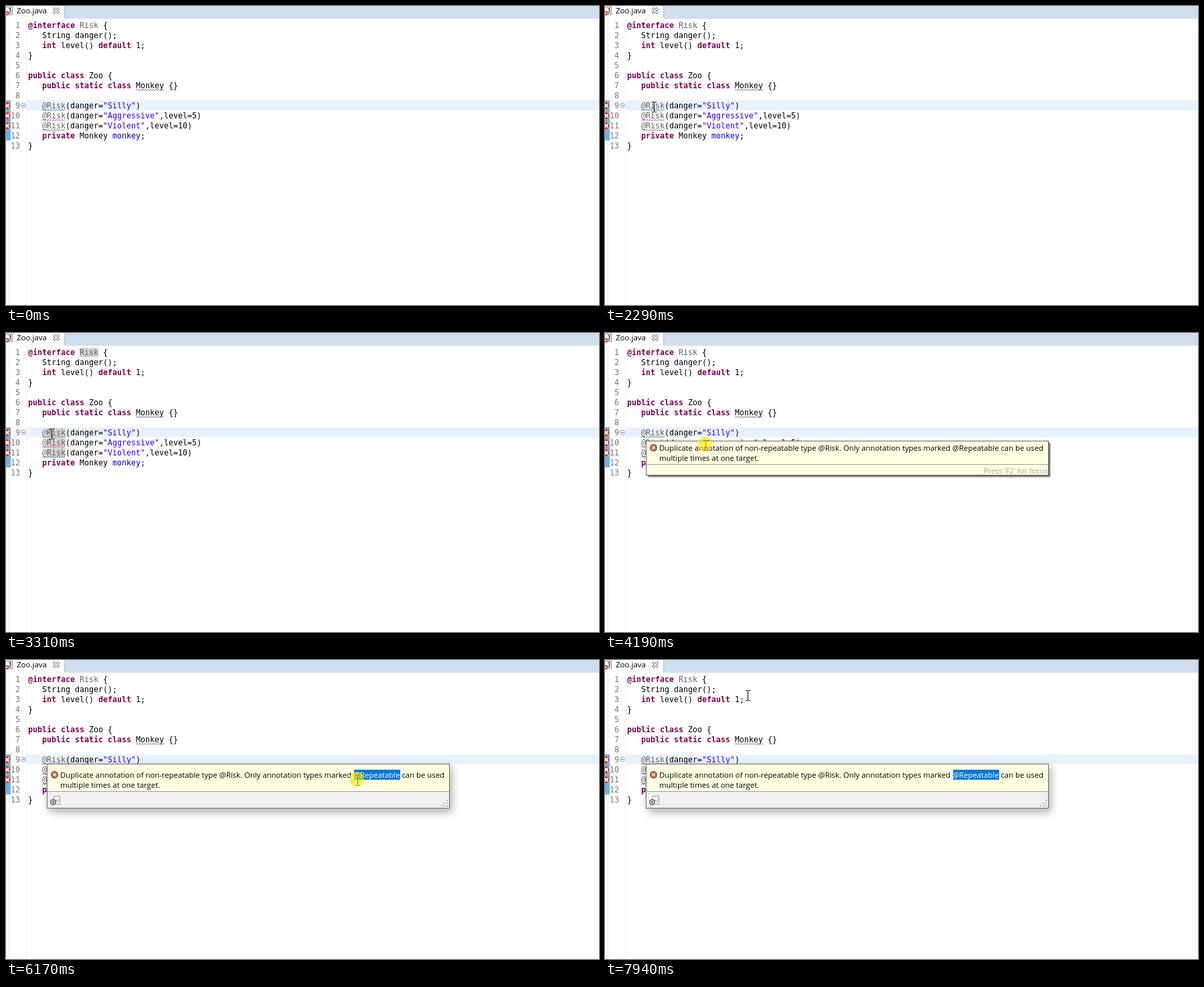
An HTML page with a canvas for the animation above (8000 ms loop, 886 by 447 pixels).

```html
<!DOCTYPE html>
<html lang="en">
<head>
<meta charset="utf-8">
<title>Editor hover</title>
<style>
  html, body { margin: 0; width: 100%; height: 100%; overflow: hidden; background: #fff; }
  canvas { display: block; }
</style>
</head>
<body>
<canvas id="stage" width="886" height="447"></canvas>
<script>
const ctx = document.getElementById('stage').getContext('2d');
const LOOP = 8000, CHAR = 7, LEFT = 33, ROW = 15;
const MONO = '11.63px "DejaVu Sans Mono", monospace';
const UI = '"Open Sans", "Noto Sans", sans-serif';
const KEYWORDS = /^(@interface|int|default|public|static|class|private)$/;

const code = `@interface Risk {
   String danger();
   int level() default 1;
}

public class Zoo {
   public static class Monkey {}

   @Risk(danger="Silly")
   @Risk(danger="Aggressive",level=5)
   @Risk(danger="Violent",level=10)
   private Monkey monkey;
}`.split('\n');
const message = [
  'Duplicate annotation of non-repeatable type @Risk. Only annotation types marked @Repeatable can be used',
  'multiple times at one target.'
];

// Each eased move: start, end, destination x, y
const entry = [438, 353];
const moves = [
  [70, 520, 8, 109],
  [600, 1080, 73, 151],
  [2290, 2910, 68, 151],
  [3710, 4120, 150, 168],
  [4330, 4600, 258, 174],
  [4700, 4940, 388, 181],
  [4970, 5290, 591, 173],
  [5420, 5760, 598, 172],
  [5960, 6170, 525, 180],
  [7520, 7940, 213, 53]
];

const within = (t, a, b) => t >= a && t < b;
const clamp = (v, lo, hi) => Math.min(hi, Math.max(lo, v));
const ease = u => u * u * (3 - 2 * u);
const lineTop = n => 22 + (n - 1) * ROW;

function rect(x, y, w, h, color) {
  ctx.fillStyle = color;
  ctx.fillRect(x, y, w, h);
}

function disc(x, y, r, color) {
  ctx.fillStyle = color;
  ctx.beginPath();
  ctx.arc(x, y, r, 0, Math.PI * 2);
  ctx.fill();
}

function stroke(points, color, width = 1) {
  ctx.strokeStyle = color;
  ctx.lineWidth = width;
  ctx.beginPath();
  points.forEach(([x, y], i) => i ? ctx.lineTo(x, y) : ctx.moveTo(x, y));
  ctx.stroke();
}

function cross(x, y, r, color, width) {
  stroke([[x - r, y - r], [x + r, y + r]], color, width);
  stroke([[x + r, y - r], [x - r, y + r]], color, width);
}

function text(str, x, y, font, color) {
  ctx.font = font;
  ctx.fillStyle = color;
  ctx.fillText(str, x, y);
}

function pointer(t) {
  let [x, y] = entry;
  for (const [start, end, toX, toY] of moves) {
    if (t < start) break;
    const u = ease(clamp((t - start) / (end - start), 0, 1));
    // small hand nudges while resting on the selection
    if (start === 7520) x = nudge(start - 1);
    x += (toX - x) * u;
    y += (toY - y) * u;
  }
  if (within(t, 6570, 7520)) x = nudge(t);
  return [Math.round(x), Math.round(y)];
}

function nudge(t) {
  const step = Math.floor((t - 6570) / 250);
  return 524.5 + 14.2 * Math.cos(step * Math.PI / 2 + 0.32);
}

function drawTab() {
  rect(0, 0, 886, 19, '#cfdeef');
  rect(0, 0, 87, 19, '#fff');
  rect(87, 0, 1, 18, '#b4c3d6');
  // file icon
  rect(0, 1, 10, 12, '#9b8a5c');
  rect(0, 2, 9, 10, '#f6f4ee');
  text('J', 2, 11, 'bold 11px "Liberation Sans", sans-serif', '#34508c');
  rect(0, 8, 4, 6, '#d8402c');
  cross(1.5, 11, 1.5, '#fff', 1);
  text('Zoo.java', 16, 11, '11.5px ' + UI, '#000');
  // close button
  cross(75, 7, 4, '#666', 3.6);
  cross(75, 7, 3.8, '#fff', 1.7);
}

function drawRuler() {
  rect(0, 19, 7, 428, '#f8f8f8');
  rect(30, 19, 1, 428, '#f0f0f0');
  rect(31, lineTop(9) - 1, 855, ROW, '#e8f2fe');
  for (let y = 141; y < 201; y++)
    for (let x = 0; x < 7; x++) rect(x, y, 1, 1, (x + y) % 2 ? '#0078d7' : '#d8ecfa');
  for (const n of [9, 10, 11]) {
    const y = lineTop(n) + 7;
    disc(1, y, 6, '#f3d3cd');
    disc(1, y, 5.5, '#d2392b');
    cross(2, y, 2.5, '#fff', 2);
  }
  ctx.strokeStyle = '#8c9db5';
  ctx.lineWidth = 1;
  ctx.beginPath();
  ctx.arc(26, 148.5, 3.5, 0, Math.PI * 2);
  ctx.stroke();
  rect(24, 148, 4, 1, '#60748f');
}

function tokenStyle(token) {
  if (KEYWORDS.test(token)) return ['bold ' + MONO, '#7f0055'];
  if (/^@?Risk$/.test(token)) return [MONO, '#646464'];
  if (token[0] === '"') return [MONO, '#2a00ff'];
  if (token === 'monkey') return [MONO, '#0000c0'];
  return [MONO, '#000'];
}

function drawCode() {
  code.forEach((line, i) => {
    const y = lineTop(i + 1) + 11, label = String(i + 1);
    text(label, 21 - CHAR * label.length, y, MONO, '#787878');
    for (const m of line.matchAll(/@?\w+|"[^"]*"|[^\w\s"@]+/g))
      text(m[0], LEFT + CHAR * m.index, y, ...tokenStyle(m[0]));
  });
}

function squiggle(n, word, color = '#6a6a6a') {
  const x = LEFT + CHAR * code[n - 1].indexOf(word), y = lineTop(n) + 13.5;
  const points = [];
  for (let i = 0; i <= CHAR * word.length; i += 2) points.push([x + i, y + (i % 4 ? -1 : 1)]);
  stroke(points, color);
}

function drawMarks() {
  for (const n of [1, 9, 10, 11]) {
    const column = code[n - 1].indexOf('Risk');
    rect(LEFT + CHAR * column, lineTop(n), CHAR * 4, 14, '#d4d4d4');
  }
}

function drawMessage() {
  disc(72.5, 171.5, 5.5, '#8f4a3c');
  disc(72.5, 171.5, 4.6, '#c9614e');
  cross(72.5, 171.5, 2, '#fff', 1.5);
  message.forEach((line, i) => text(line, 81, 176 + i * ROW, '11.33px ' + UI, '#000'));
}

function drawHint() {
  for (let i = 4; i > 1; i--) rect(61 + i, 161 + i, 601, 51, 'rgba(0,0,0,.25)');
  rect(61, 161, 602, 52, '#646464');
  rect(62, 162, 600, 50, '#ffffe1');
  rect(62, 196, 600, 1, '#a0a0a0');
  drawMessage();
  text("Press 'F2' for focus", 566, 210, '11px ' + UI, '#a9a99a');
}

function drawPopup() {
  ctx.save();
  ctx.shadowColor = 'rgba(0,0,0,.33)';
  ctx.shadowBlur = 12;
  ctx.shadowOffsetX = 3;
  ctx.shadowOffsetY = 5;
  rect(61, 155, 602, 67, '#6c6c6c');
  ctx.restore();
  rect(62, 156, 600, 65, '#f0f0f0');
  rect(62, 156, 600, 40, '#ffffe1');
  rect(62, 196, 600, 1, '#a0a0a0');
  drawMessage();
  // toolbar icon
  rect(71, 203, 10, 13, '#a8a29a');
  rect(72, 204, 8, 11, '#fbfaf7');
  stroke([[73, 213], [75, 209], [77, 212], [80, 208]], '#c98a70');
  disc(70.5, 212.5, 4.5, '#5c6f86');
  disc(70.5, 212.5, 2.8, '#dfe6ee');
  disc(70.5, 212.5, 1.4, '#46586e');
  // resize grip
  for (let row = 0; row < 3; row++)
    for (let col = 0; col <= row; col++)
      rect(658 - col * 4, 209 + row * 4, 2, 2, '#a9b6c8');
}

function drawSelection(from) {
  const width = 589 - from;
  ctx.save();
  ctx.beginPath();
  ctx.rect(from, 164, width, 15);
  ctx.clip();
  rect(from, 164, width, 15, '#0078d7');
  text(message[0], 81, 176, '11.33px ' + UI, '#fff');
  ctx.restore();
}

function drawPointer(x, y) {
  rect(x, y - 7, 1, 14, '#000');
  for (const edge of [y - 8, y + 7]) {
    rect(x - 3, edge, 3, 1, '#000');
    rect(x + 1, edge, 3, 1, '#000');
  }
}

function draw(t) {
  const [x, y] = pointer(t);
  rect(0, 0, 886, 447, '#fff');
  drawTab();
  drawRuler();
  if (within(t, 2640, 4180)) drawMarks();
  drawCode();
  squiggle(7, 'Monkey');
  squiggle(9, '@Risk');
  squiggle(10, '@Risk', '#e0348c');
  squiggle(11, '@Risk');

  if (within(t, 3350, 4260)) drawHint();
  if (t >= 4260) drawPopup();
  if (within(t, 4260, 4600)) rect(81, 164, 1, 15, '#000');
  // caret blinks until the drag begins
  if (within(t, 4600, 5960) && Math.floor((t - 4600) / 530) % 2 === 0) rect(258, 164, 1, 15, '#000');
  if (t >= 5960) drawSelection(t < 6170 ? clamp(x, 520, 589) : 520);

  if (t >= 70) drawPointer(x, y);
  const pressed = within(t, 2360, 2500) || within(t, 4120, 4320) ||
    within(t, 4600, 4700) || within(t, 5960, 6500);
  if (pressed) disc(x - 1, y - 2, 11, 'rgba(250,232,0,.6)');
}

function frame(now) {
  draw(now % LOOP);
  requestAnimationFrame(frame);
}
requestAnimationFrame(frame);
</script>
</body>
</html>
```
